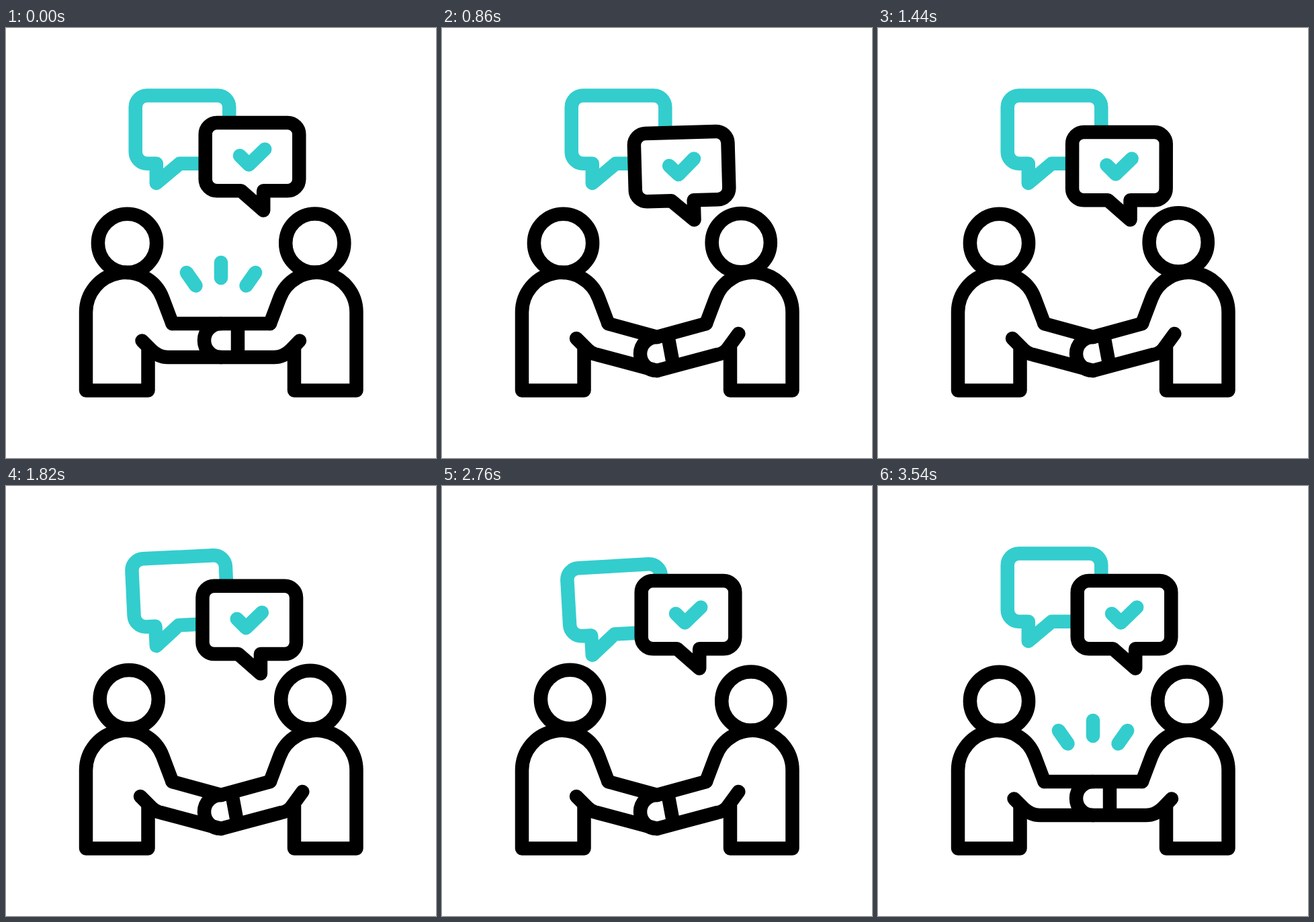
Animation of 640x640 px, one loop 3.6 s. Source, as an HTML page:

```html
<!DOCTYPE html>
<html lang="en">
<head>
<meta charset="utf-8">
<title>Agreement</title>
<style>
html, body { margin: 0; width: 100%; height: 100%; overflow: hidden; background: #fff; }
svg { display: block; width: 100vw; height: 100vh; }
.ink { fill: none; stroke: #000; stroke-width: 20.5; stroke-linecap: round; stroke-linejoin: round; }
.teal { stroke: #33cdcd; }
.paper { fill: #fff; }
</style>
</head>
<body>
<svg viewBox="0 0 640 640">
  <defs>
    <path id="body" d="M211.5 476V539.5H119V423A59 59 0 0 1 233.4 402.6L247.5 440"/>
  </defs>
  <g class="ink">
    <g id="leftBubble">
      <path class="teal" d="M210 100.5H315A17.3 17.3 0 0 1 332.3 117.8V184.5A17.3 17.3 0 0 1 315 201.8H258.5L223.8 231V201.8H210A17.3 17.3 0 0 1 192.7 184.5V117.8A17.3 17.3 0 0 1 210 100.5Z"/>
    </g>
    <g id="rightBubble">
      <path class="paper" d="M314 141H419A17.3 17.3 0 0 1 436.3 158.3V225A17.3 17.3 0 0 1 419 242.3H383.2V271.5L349.8 242.3H314A17.3 17.3 0 0 1 296.7 225V158.3A17.3 17.3 0 0 1 314 141Z"/>
      <path class="teal" d="M348 190L361.5 203.5L385.2 180.5"/>
    </g>
    <circle id="leftHead" r="43.6"/>
    <circle id="rightHead" r="43.6"/>
    <use href="#body"/>
    <use href="#body" transform="translate(640.5) scale(-1 1)"/>
    <path id="arms"/>
    <path id="palm"/>
    <path id="cuff"/>
    <path id="rays" class="teal"/>
  </g>
</svg>
<script>
const LOOP = 3600;
const $ = id => document.getElementById(id);
const mix = (a, b, k) => a + (b - a) * k;
const clamp = x => Math.min(1, Math.max(0, x));
const ease = (t, a, b) => {
  const k = clamp((t - a) / (b - a));
  return k * k * (3 - 2 * k);
};
const set = (id, name, value) => $(id).setAttribute(name, value);

// Swing up to the first peak, then a decaying wobble around zero.
function wobble(t, decay) {
  const s = t - 470;
  return s < 0 ? ease(t, 200, 470) : Math.exp(-decay * s) * Math.cos(s * Math.PI / 200);
}

function drawHands(t) {
  const d = 1.45 * ease(t, 0, 230) - 0.45 * ease(t, 230, 420)
    + 0.45 * ease(t, 3220, 3330) - 1.45 * ease(t, 3330, 3540);
  const y = 20 * d;
  const p = (x0, y0, x1, y1) => `${mix(x0, x1, d)} ${mix(y0, y1, d)} `;
  set('arms', 'd',
    `M247.5 440L320 ${440 + y}L393 440` +
    'M' + p(202.5, 465.5, 200, 462) + 'L' + p(216, 479, 216.5, 478.5) +
    'C' + p(223, 486, 221, 483) + p(231, 490, 224, 485) + p(241, 490, 230, 486) +
    `L320 ${490 + y}L` + p(399, 490, 410, 486) +
    'C' + p(409, 490, 416, 485) + p(417, 486, 420, 483) + p(424, 479, 424.5, 478) +
    'L' + p(437, 465.5, 441.3, 455));
  set('palm', 'd', `M320 ${440 + y}A25 25 0 0 0 320 ${490 + y}`);
  set('cuff', 'd', 'M' + p(345, 441, 336, 457) + 'L' + p(345, 489, 344, 500));
}

function drawRays(t) {
  const k = t < 1800 ? 1 - ease(t, 0, 200) : ease(t, 3380, 3540);
  const ray = (x0, y0, x1, y1) => `M${x1} ${y1}L${mix(x1, x0, k)} ${mix(y1, y0, k)}`;
  set('rays', 'd', ray(268.8, 364, 282.5, 383.5) + ray(320, 349, 320, 372) + ray(371.2, 364, 357.5, 383.5));
  set('rays', 'visibility', k > 0.02 ? 'visible' : 'hidden');
}

function drawRight(t) {
  const move = ease(t, 0, 400) * (1 - ease(t, 1500, 2190));
  const turn = -12.7 * wobble(t, 0.0053);
  set('rightBubble', 'transform', `translate(${-7.7 * move} ${14 * move}) rotate(${turn} 383.2 271.5)`);
  const x = 459.8 - 12.9 * move - 5 * wobble(t, 0.0028);
  set('rightHead', 'cx', x);
  set('rightHead', 'cy', 318.25 + 0.031 * (x - 451.9) ** 2);
}

function drawLeft(t) {
  const move = ease(t, 1580, 2200) * (1 - ease(t, 3230, 3540));
  const sway = ease(t, 2260, 2740) - ease(t, 2740, 3230);
  const turn = move * (-8 + 4.8 * sway);
  set('leftBubble', 'transform', `translate(0 ${20.7 * move}) rotate(${turn} 223.8 231)`);
  const x = 180.5 + move * (8 + 2 * sway);
  set('leftHead', 'cx', x);
  set('leftHead', 'cy', 316.1 + 0.1 * (x - 187) ** 2);
}

function draw(t) {
  drawHands(t);
  drawRays(t);
  drawRight(t);
  drawLeft(t);
}

const start = performance.now();
function tick(now) {
  draw(Math.max(0, now - start) % LOOP);
  requestAnimationFrame(tick);
}
draw(0);
requestAnimationFrame(tick);
</script>
</body>
</html>
```
